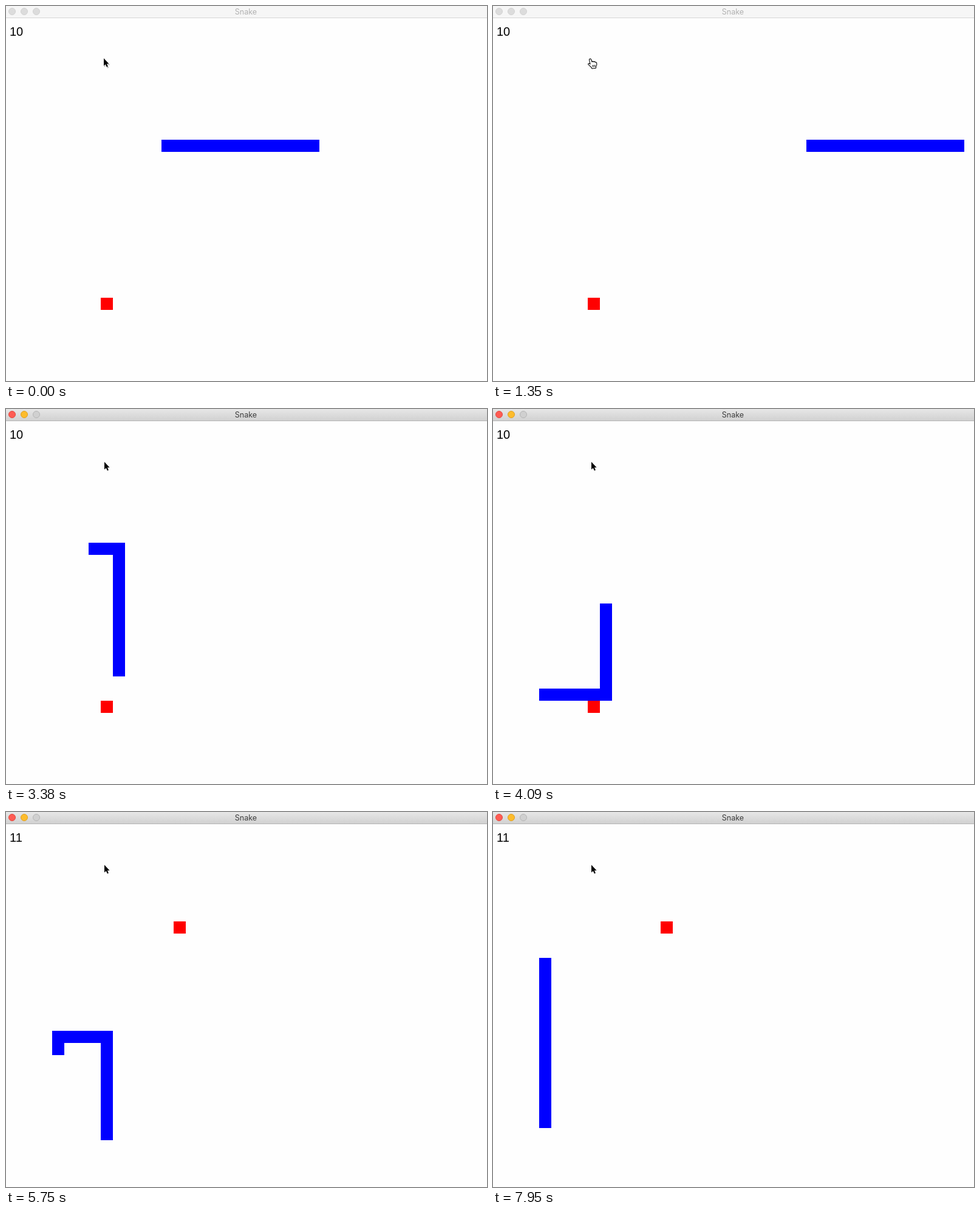
An HTML page for the animation above (8 s loop, 792 by 617 pixels).

```html
<!DOCTYPE html>
<html lang="en">
<head>
<meta charset="utf-8">
<title>Snake</title>
<style>
  html, body { margin: 0; width: 100%; height: 100%; overflow: hidden; background: #fefefe; }
  svg { display: block; }
  .title { font: 12.5px Inter, Roboto, sans-serif; text-anchor: middle; fill: #b1b1b1; }
  .score { font: 20px "Liberation Sans", Arial, sans-serif; fill: #000; }
  .bar { fill: #f6f6f6; }
  .edge { fill: #d6d6d6; }
  .light { fill: #dcdcdc; stroke: #d2d2d2; }
  .active .title { fill: #3c3c3c; }
  .active .bar { fill: url(#chrome); }
  .active .edge { fill: #b4b4b4; }
  .active .close { fill: #ff5c54; stroke: #e2483f; }
  .active .mini { fill: #fdbc2c; stroke: #dfa023; }
  .active .zoom { fill: #d0d0d0; stroke: #b6b6b6; }
  #snake { fill: #00f; }
  #food { fill: #f00; }
  .cells { shape-rendering: crispEdges; }
  .hand { fill: #fff; stroke: #000; stroke-width: 1.1; stroke-linejoin: round; }
</style>
</head>
<body>
<svg id="stage" width="792" height="617" viewBox="0 0 792 617">
  <defs>
    <linearGradient id="chrome" x1="0" y1="0" x2="0" y2="1">
      <stop offset="0" stop-color="#e7e7e7"/>
      <stop offset="1" stop-color="#d1d1d1"/>
    </linearGradient>
    <path id="arrow" d="M0 0V12.6L2.8 9.9L4.9 14.4L6.9 13.6L4.9 9.2H8.6Z"/>
  </defs>
  <rect width="792" height="617" fill="#fefefe"/>
  <rect class="bar" width="792" height="19"/>
  <rect class="edge" y="19" width="792" height="1"/>
  <circle class="light close" cx="10" cy="9" r="5.5"/>
  <circle class="light mini" cx="30" cy="9" r="5.5"/>
  <circle class="light zoom" cx="50" cy="9" r="5.5"/>
  <text class="title" x="395" y="14">Snake</text>
  <text class="score" id="score" x="6" y="49">10</text>
  <g class="cells">
    <path id="snake"/>
    <rect id="food" width="20" height="20"/>
  </g>
  <g id="idle" transform="translate(161 86)">
    <use href="#arrow" x="1" y="1.5" opacity=".3" stroke="#000" stroke-width="1"/>
    <use href="#arrow" stroke="#fff" stroke-width="1.6" paint-order="stroke"/>
  </g>
  <g id="hand" class="hand" transform="translate(156 86)">
    <path d="M3.5 1C4.5 .5 5.3 1 5.6 2L7 6C7.5 4.8 9 4.8 9.6 6C10.2 5 11.8 5.2 12.2 6.6C13 6 14.4 6.5 14.7 8C15.2 10 14.8 12 13.6 13.5L13.4 16.3L7 17C6.5 15 3.5 12.5 1 10.3C.2 9.3 1.2 8.2 2.5 8.6L4 9.6L2.6 3C2.3 2 2.7 1.2 3.5 1Z"/>
    <path d="M8 11v3.5M10 11v3.5M12 10.8v3.5" stroke-width=".9"/>
  </g>
  <use id="done" href="#arrow" x="162" y="87"/>
</svg>
<script>
const LOOP = 8000, CELL = 20, LENGTH = 13, EAT = 56;
const HOVER = 630, FOCUS = 1530;
const $ = id => document.getElementById(id);

// Runs of moves: first time, last time, count
const runs = [
  [90, 90, 1], [270, 900, 8], [1080, 1790, 9], [1970, 2590, 8],
  [2770, 3380, 8], [3560, 4270, 9], [4450, 5060, 8], [5240, 5930, 9],
  [6110, 6720, 8], [6900, 7590, 9], [7770, 7950, 3]
];
const ticks = runs.flatMap(([from, to, n]) =>
  Array.from({ length: n }, (_, i) =>
    Math.floor((from + (to - from) * i / Math.max(1, n - 1)) / 10) * 10));

// Route of the head, starting at the first tail cell: dx, dy, cells
const route = [
  [1, 0, 36], [0, 1, 12], [-1, 0, 5], [0, -1, 5],
  [1, 0, 4], [0, 1, 10], [-1, 0, 4], [0, -1, 16]
];
const trail = [[256, 220]];
for (const [dx, dy, n] of route) {
  for (let i = 0; i < n; i++) {
    const [x, y] = trail[trail.length - 1];
    trail.push([(x + dx * CELL + 4) % 800 - 4, y + dy * CELL]);
  }
}

const show = (id, on) => { $(id).style.display = on ? "" : "none"; };

function draw(t) {
  const step = ticks.filter(tick => tick <= t).length;
  const fed = step >= EAT;
  const body = trail.slice(fed ? step - 1 : step, step + LENGTH);
  $("snake").setAttribute("d", body.map(([x, y]) => `M${x} ${y}h20v20h-20z`).join(""));
  $("food").setAttribute("x", fed ? 276 : 156);
  $("food").setAttribute("y", fed ? 180 : 480);
  $("score").textContent = fed ? 11 : 10;
  $("stage").classList.toggle("active", t >= FOCUS);
  show("idle", t < HOVER);
  show("hand", t >= HOVER && t < FOCUS);
  show("done", t >= FOCUS);
}

const start = performance.now();
function frame() {
  draw((performance.now() - start) % LOOP);
  requestAnimationFrame(frame);
}
frame();
</script>
</body>
</html>
```
